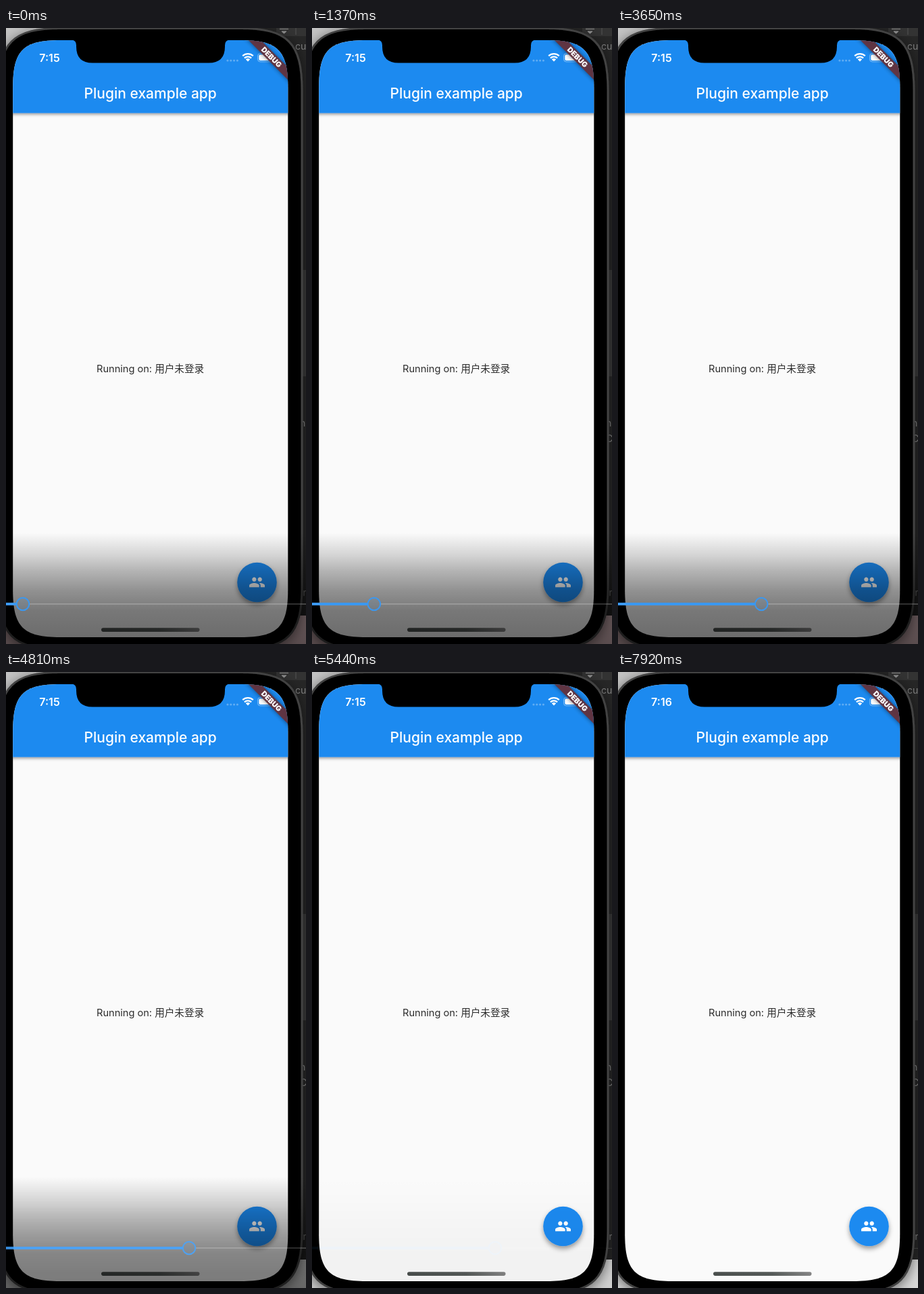
Animation of 444 by 909 pixels, one loop 8 s. Source, as an HTML page:

```html
<!DOCTYPE html>
<html lang="en">
<head>
<meta charset="utf-8">
<title>Plugin example app</title>
<style>
  html, body { margin: 0; width: 100%; height: 100%; overflow: hidden; background: #262626; }
  svg { display: block; width: 100vw; height: 100vh; }
  text { font-family: Inter, "Noto Sans CJK SC", "Noto Sans CJK", sans-serif; }
</style>
</head>
<body>
<svg viewBox="0 0 444 909" preserveAspectRatio="none">
  <defs>
    <clipPath id="screen"><path id="screenShape"/></clipPath>
    <linearGradient id="shade" x2="0" y2="1">
      <stop offset="0" stop-opacity="0"/>
      <stop offset=".21" stop-opacity=".16"/>
      <stop offset=".34" stop-opacity=".28"/>
      <stop offset=".52" stop-opacity=".42"/>
      <stop offset=".7" stop-opacity=".52"/>
      <stop offset="1" stop-opacity=".58"/>
    </linearGradient>
    <linearGradient id="handle">
      <stop stop-color="#4a4f4d"/>
      <stop offset=".6" stop-color="#555a58"/>
      <stop offset="1" stop-color="#858585"/>
    </linearGradient>
    <filter id="phoneShadow" x="-10%" y="-10%" width="120%" height="120%">
      <feDropShadow dx="0" dy="4" stdDeviation="9" flood-opacity=".5"/>
    </filter>
    <filter id="barShadow" x="-10%" y="-20%" width="120%" height="150%">
      <feDropShadow dx="0" dy="2" stdDeviation="2" flood-opacity=".4"/>
    </filter>
    <filter id="bannerShadow" x="-20%" y="-150%" width="140%" height="400%">
      <feGaussianBlur stdDeviation="3"/>
    </filter>
    <filter id="buttonShadow" x="-40%" y="-40%" width="180%" height="180%">
      <feDropShadow dx="0" dy="4" stdDeviation="3.5" flood-opacity=".38"/>
    </filter>
  </defs>

  <!-- desktop behind the phone -->
  <rect width="444" height="909" fill="#262626"/>
  <rect width="75" height="60" fill="#c4c4c4"/>
  <path d="M436 357h8v157h-8z" fill="#383838"/>
  <path d="M400 0h44v12h-44z" fill="#333"/>
  <g id="floor">
    <rect y="850" width="80" height="59"/>
    <rect x="360" y="867" width="84" height="42"/>
  </g>
  <path d="M436 850.5h8" stroke="#484848"/>
  <g fill="#808080" font-size="14">
    <text x="428" y="32">cu</text>
    <text x="435" y="588">n</text>
    <text id="lateLetter" x="435" y="611">C</text>
    <text x="432" y="838" font-size="13">er</text>
  </g>

  <!-- phone body -->
  <path id="phoneShape" stroke="#424242" stroke-width="3" filter="url(#phoneShadow)"/>
  <path d="M405 1.5h13M408 5h7l-3.500 3z" stroke="#888" fill="#888"/>
  <path d="M429 0v10" stroke="#555"/>

  <g clip-path="url(#screen)">
    <rect x="10" y="18" width="408" height="881" fill="#fafafa"/>
    <rect x="0" y="8" width="428" height="117.5" fill="#1e8af0" filter="url(#barShadow)"/>
    <g fill="#fff">
      <text x="213.7" y="104" font-size="21" font-weight="500" text-anchor="middle">Plugin example app</text>
      <text id="clock" x="64.5" y="50" font-size="16" font-weight="600" text-anchor="middle"></text>
      <g opacity=".3">
        <circle cx="328" cy="48" r="1.6"/><circle cx="332.8" cy="48" r="1.6"/>
        <circle cx="337.6" cy="48" r="1.6"/><circle cx="342.4" cy="48" r="1.6"/>
      </g>
      <path d="M358 49.5l-3.2-3.2a4.6 4.6 0 0 1 6.4 0z"/>
      <path d="M352.9 44.4a7.3 7.3 0 0 1 10.2 0M350.2 41.2a11.2 11.2 0 0 1 15.6 0" fill="none" stroke="#fff" stroke-width="2.3"/>
      <rect x="374.3" y="39.3" width="19.5" height="8.8" rx="2"/>
      <rect x="372.6" y="37.6" width="23" height="12.2" rx="3.5" fill="none" stroke="#fff" stroke-opacity=".45"/>
      <path d="M397 41.5q2 2 0 4.4z" opacity=".5"/>
    </g>
    <g transform="translate(393 43) rotate(45)">
      <rect x="-60" y="-6.5" width="120" height="13" fill-opacity=".5" filter="url(#bannerShadow)"/>
      <rect x="-60" y="-6.5" width="120" height="13" fill="#64333f" fill-opacity=".94"/>
      <text y="4" font-size="10.8" font-weight="900" text-anchor="middle" fill="#fff">DEBUG</text>
    </g>
    <text x="134" y="507.5" font-size="14.6" fill="#2c2c2c">Running on: 用户未登录</text>
    <circle cx="371.5" cy="818" r="29.3" fill="#1e8af0" filter="url(#buttonShadow)"/>
    <path transform="translate(359 805.3) scale(1.045)" fill="#fff" d="M16 11c1.66 0 2.99-1.34 2.99-3S17.66 5 16 5s-3 1.34-3 3 1.34 3 3 3zm-8 0c1.66 0 2.99-1.34 2.99-3S9.66 5 8 5 5 6.34 5 8s1.34 3 3 3zm0 2c-2.33 0-7 1.17-7 3.5V19h14v-2.5c0-2.33-4.67-3.5-7-3.5zm8 0c-.29 0-.62.02-.97.05 1.16.84 1.97 1.97 1.97 3.45V19h6v-2.5c0-2.33-4.67-3.5-7-3.5z"/>
    <rect x="141" y="885.3" width="145.5" height="5.6" rx="2.8" fill="url(#handle)"/>
  </g>
  <path d="M97 17.5q7 .5 7 8v2q0 24 24 24h172q24 0 24-24v-2q0-7.500 7-8z"/>

  <!-- player controls -->
  <g id="controls">
    <rect y="745" width="444" height="164" fill="url(#shade)"/>
    <path id="rest" stroke="#fff" stroke-opacity=".25" stroke-width="1.6"/>
    <path id="played" stroke="#3b98f0" stroke-width="4"/>
    <circle id="knob" cy="850" r="9.3" fill="#3b98f0" fill-opacity=".08" stroke="#3b98f0" stroke-width="2"/>
  </g>
</svg>
<script>
  const LOOP = 8000, TICK = 255, STEP = 13.37, START_X = 25, STOP_X = 271;
  const el = id => document.getElementById(id);
  const clamp01 = v => Math.max(0, Math.min(1, v));

  // Rectangle whose corners bend smoothly over `reach`, with handles `pull` from each corner.
  function smoothRect(left, top, right, bottom, reach, pull) {
    const far = reach - pull;
    return `M${left} ${top + reach}c0 ${-far} ${far} ${-far - pull} ${reach} ${-reach}`
      .replace(/c.*/, `C${left} ${top + pull} ${left + pull} ${top} ${left + reach} ${top}`)
      + `H${right - reach}C${right - pull} ${top} ${right} ${top + pull} ${right} ${top + reach}`
      + `V${bottom - reach}C${right} ${bottom - pull} ${right - pull} ${bottom} ${right - reach} ${bottom}`
      + `H${left + reach}C${left + pull} ${bottom} ${left} ${bottom - pull} ${left} ${bottom - reach}Z`;
  }

  el('screenShape').setAttribute('d', smoothRect(10.2, 18, 417.3, 899, 70, 15));
  el('phoneShape').setAttribute('d', smoothRect(-11, 0.5, 438, 916.5, 92, 21));

  function draw(t) {
    const x = t < 4700 ? START_X + STEP * Math.floor(t / TICK) : STOP_X;
    el('knob').setAttribute('cx', x);
    el('played').setAttribute('d', `M0 850H${x - 9}`);
    el('rest').setAttribute('d', `M${x + 10} 850H444`);
    el('controls').setAttribute('opacity', clamp01(1 - (t - 4735) / 750));
    el('clock').textContent = t < 6700 ? '7:15' : '7:16';
    el('lateLetter').setAttribute('opacity', t < 900 ? 0 : 1);
    el('floor').setAttribute('fill', t < 4340 ? '#d8b8bc' : '#d8d8d8');
  }

  const begin = performance.now();
  function frame() {
    draw((performance.now() - begin) % LOOP);
    requestAnimationFrame(frame);
  }
  frame();
</script>
</body>
</html>
```
